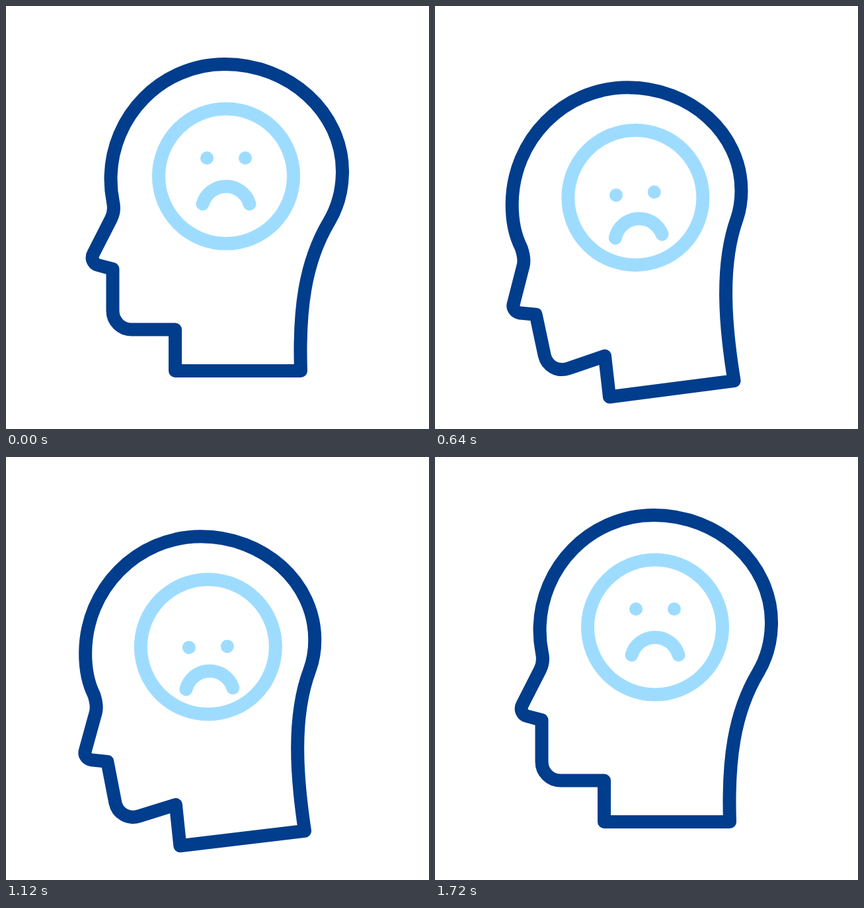
Recreate the animation shown at these times as an HTML page. Size 640 by 640 pixels, loop 1.8 s.

```html
<!DOCTYPE html>
<html lang="en">
<head>
<meta charset="utf-8">
<title>Sad head</title>
<style>
  html, body { margin: 0; width: 100%; height: 100%; overflow: hidden; background: #fff; }
  svg { display: block; width: 100%; height: 100%; }
</style>
</head>
<body>
<svg viewBox="0 0 640 640">
  <path id="head" fill="none" stroke="#003d8c" stroke-width="20" stroke-linejoin="round"/>
  <g id="badge" fill="none" stroke="#9edcff" stroke-width="20" stroke-linecap="round">
    <circle r="102"/>
    <g id="face">
      <g id="eyes" fill="#9edcff" stroke="none">
        <circle cx="-29" cy="-27.5" r="10"/>
        <circle cx="29" cy="-27.5" r="10"/>
      </g>
      <path id="mouth" d="M-35.5 42A37 37 0 0 1 35.5 42"/>
    </g>
  </g>
</svg>
<script>
const LOOP = 1800, STEP = 40, PEAK = 842;
const $ = id => document.getElementById(id);
const [head, badge, face, eyes, mouth] = ['head', 'badge', 'face', 'eyes', 'mouth'].map($);

// Both poses share the same commands, so they blend point by point.
const upright = `M446 552 C443 460 452 388 489 326 C502 304 509 278 509 250
  C509 161 429 88 331 88 C236 88 158.5 166 158.5 262
  C158.5 275 160 287 162 297 C164 306 163 314 159 322 L132.5 374
  C128 382 132 390 139 392 L161.5 398 L161.5 461
  C161.5 477 174 489.5 190 489.5 L256 489.5 L256 552 Z`;
const bowed = `M453 568 C439.5 490 429.5 395 454.7 322 C458.7 309 460.6 295 460.6 281
  C460.6 194.5 384 125.5 289 125.5 C192 125.5 114 205 114 303
  C114 328 118 350 128.5 370 C132 380 134 388 132 397 L118 455
  C116 462 121 468 128 469 L152 471 L166 533
  C170 549 186 558 203 552 L257 532 L264.5 594 Z`;
const bowedPoints = bowed.match(/[\d.]+/g).map(Number);

const mix = (a, b, k) => a + (b - a) * k;
const span = (t, a, b) => Math.min(1, Math.max(0, (t - a) / (b - a)));
const smooth = x => x * x * (3 - 2 * x);

// Cubic easing with handles (a, 0) and (b, 1).
function bezier(x, a, b) {
  let lo = 0, hi = 1;
  for (let i = 0; i < 24; i++) {
    const s = (lo + hi) / 2, r = 1 - s;
    if (3 * s * r * r * a + 3 * s * s * r * b + s * s * s < x) lo = s;
    else hi = s;
  }
  return smooth((lo + hi) / 2);
}

const nod = t => 1.029 * (t < PEAK
  ? bezier(span(t, 50, PEAK), 0.6, 0.4)
  : 1 - bezier(span(t, PEAK, 1685), 0.6, 0.4));

const slide = t => smooth(span(t, 300, 860)) - smooth(span(t, 984, 1536));

const tiltKeys = [[360, 0], [920, -9.3], [1160, -1.2], [1380, -6.5], [1660, 0]];
function tilt(t) {
  let angle = 0;
  for (let i = 1; i < tiltKeys.length; i++) {
    const [t0, a0] = tiltKeys[i - 1], [t1, a1] = tiltKeys[i];
    angle += (a1 - a0) * smooth(span(t, t0, t1));
  }
  return angle;
}

function draw(t) {
  const k = nod(t), drop = 32.5 * slide(t);
  let i = 0;
  head.setAttribute('d', upright.replace(/[\d.]+/g, n => mix(+n, bowedPoints[i++], k).toFixed(2)));
  badge.setAttribute('transform', `translate(${mix(333, 301.5, k)} ${mix(257.5, 292, k)})`);
  face.setAttribute('transform', `rotate(${tilt(t)})`);
  eyes.setAttribute('transform', `translate(0 ${drop})`);
  mouth.setAttribute('transform', `translate(0 ${drop * 0.77})`);
}

const start = performance.now();
function tick() {
  const t = (performance.now() - start) % LOOP;
  draw(Math.floor(t / STEP) * STEP);
  requestAnimationFrame(tick);
}
tick();
</script>
</body>
</html>
```
